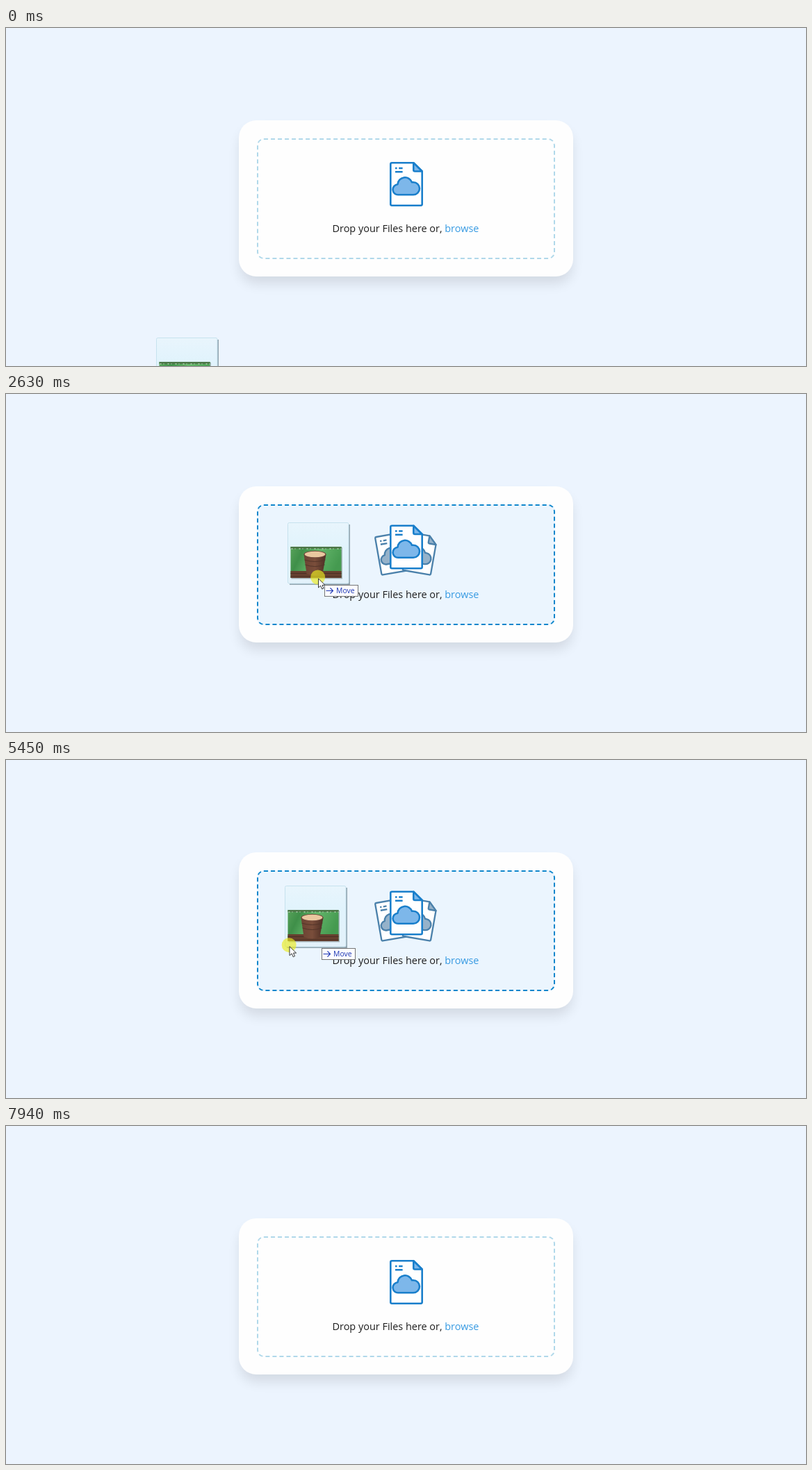
These frames come from a looping animation (1151x487 px, 8000 ms). An HTML page:

```html
<!DOCTYPE html>
<html lang="en">
<head>
<meta charset="utf-8">
<title>File drop</title>
<style>
  html, body { margin: 0; width: 100%; height: 100%; overflow: hidden; background: #ecf4fe; }
  #card, #zone, svg { position: absolute; box-sizing: border-box; }
  #card { left: 335px; top: 133px; width: 481px; height: 225px; border-radius: 25px;
          background: #fefefe; box-shadow: 0 12px 18px -2px rgba(0, 0, 0, .11); }
  #zone { left: 361px; top: 159px; width: 429px; height: 174px; border-radius: 10px; border: 2px dashed; }
  svg { left: 0; top: 0; }
  text { font-family: "Open Sans", "Noto Sans", sans-serif; }
  .page { stroke: #1a7fcb; fill: #7db7ea; stroke-width: 2.6; stroke-linejoin: round; }
  .muted { stroke: #4b81ab; fill: #95b2ca; }
</style>
</head>
<body>
<div id="card"></div>
<div id="zone"></div>
<svg width="1151" height="487" viewBox="0 0 1151 487">
  <defs>
    <g id="doc">
      <path fill="#fff" d="M-22.7-28.7q0-2 2-2H10.3L22.7-18.5V28.7q0 2-2 2H-20.7q-2 0-2-2Z"/>
      <path d="M10.3-30.7V-20.5q0 2 2 2H22.7Z"/>
      <path fill="none" d="M-16-23h2.6m2.6 0h5.4M-16-17.8H-5.4"/>
      <path d="M10 15.2A9 9 0 0 0 10-2.8H8A10.6 10.6 0 0 0-12.5.2A7.5 7.5 0 0 0-11.4 15.2Z"/>
    </g>
    <linearGradient id="glass" x2="0" y2="1">
      <stop stop-color="#e8f5fc" stop-opacity=".85"/>
      <stop offset=".4" stop-color="#def3fc" stop-opacity=".8"/>
      <stop offset="1" stop-color="#e2f1fa" stop-opacity=".85"/>
    </linearGradient>
    <linearGradient id="leaves" x2="1" y2=".3">
      <stop stop-color="#58a35a"/><stop offset=".25" stop-color="#3f8f49"/>
      <stop offset=".55" stop-color="#63b56a"/><stop offset="1" stop-color="#459a50"/>
    </linearGradient>
    <linearGradient id="clay">
      <stop stop-color="#6b4333"/><stop offset=".5" stop-color="#7a4e3b"/><stop offset="1" stop-color="#4c2e25"/>
    </linearGradient>
  </defs>

  <use id="left" href="#doc" class="page muted"/>
  <use id="right" href="#doc" class="page muted"/>
  <use id="front" href="#doc" class="page"/>
  <text x="469.5" y="294" font-size="14.45" fill="#1c1c1c">Drop your Files here or, <tspan fill="#369ae2">browse</tspan></text>

  <g id="file">
    <path d="M3 89H89V3" fill="none" stroke="#7d929c" stroke-width="2" opacity=".8"/>
    <rect x=".5" y=".5" width="87.5" height="87.5" rx="2" fill="url(#glass)" stroke="#c6e2ee"/>
    <g transform="translate(4.5 35)">
      <rect x="1" y="1" width="73.5" height="45.5" fill="#6d7d80" opacity=".5"/>
      <rect width="73" height="45" fill="url(#leaves)"/>
      <path d="M0 1.5H73" stroke="#4d7848" stroke-width="3"/>
      <path d="M1 3H73" stroke="#dcefdc" stroke-dasharray="2 3 1 5"/>
      <rect y="35" width="73" height="10" fill="#66402f"/>
      <path d="M0 38.5H73M0 43H73" stroke="#4a2f25"/>
      <path d="M19 11L23 39Q35 44 46 39L51 11Z" fill="url(#clay)"/>
      <path d="M20 19Q35 24 50 19M21 26Q35 31 49 26" fill="none" stroke="#533529"/>
      <ellipse cx="35" cy="11" rx="16" ry="5.3" fill="#70473a"/>
      <ellipse cx="35" cy="11" rx="14.8" ry="4.2" fill="#e9c79f"/>
    </g>
  </g>
  <g id="cursor">
    <circle r="10.5" fill="#ecec20" opacity=".66"/>
    <path transform="translate(.8 2)" d="M0 0V13L3.1 10.2 5.2 15 7.5 14 5.5 9.4H9.6Z" fill="#fff" stroke="#222" stroke-width=".9"/>
  </g>
  <g id="label" fill="none" stroke="#1d36b4">
    <rect id="frame" x=".5" y=".5" height="16" fill="#fcfcff" stroke="#767676"/>
    <path id="sign"/>
    <text id="action" x="17" y="12.3" font-size="10.4" fill="#1d36b4" stroke="none"></text>
  </g>
</svg>
<script>
const LOOP = 8000, FADE = 350, LEAD = 34, MAX_LEAD = 38;

// Each drag: start, end, then evenly timed places of the file. It rests until the next drag.
const drags = [
  [0, 0, '216,446'],
  [380, 539, '217,439 217,448'],
  [540, 540, '262,500'],
  [770, 1550, '262,478 281,413 302,352 312,299 311,272'],
  [1620, 1850, '310,268 305,254'],
  [2180, 2630, '309,250 342,221 386,194 405,185'],
  [3190, 3600, '380,185 160,183 132,184 120,185'],
  [4120, 4890, '122,180 180,140 270,133 365,160 409,183'],
  [5450, 5920, '402,181 235,210 118,219 83,222'],
  [6160, 6930, '86,221 165,209 290,193 378,184 406,180'],
  [7400, 7880, '402,168 362,66 294,24 244,2'],
  [7940, 7940, '244,-140']
].map(([from, to, path]) => ({ from, to, points: path.split(' ').map(point => point.split(',').map(Number)) }));
const hovers = [[2240, 3210], [4470, 5520], [6480, 7480]];

const el = id => document.getElementById(id);
const mix = (a, b, p) => a + (b - a) * p;
const mixColor = (a, b, p) => `rgb(${a.map((v, i) => mix(v, b[i], p))})`;
const place = (id, x, y, more = '') => el(id).setAttribute('transform', `translate(${x} ${y})${more}`);

function smooth(x) {
  const p = Math.min(1, Math.max(0, x));
  return p * p * (3 - 2 * p);
}

// File position, and how far the pointer runs ahead of it in fast moves.
function pose(t) {
  const { from, to, points } = drags.findLast(drag => drag.from <= t);
  const last = points.length - 1;
  if (t >= to) return [...points[last], 0, 0];
  const at = (t - from) / (to - from) * last, i = Math.floor(at);
  const [a, b] = [points[i], points[i + 1]];
  const velocity = a.map((v, k) => (b[k] - v) * last / (to - from));
  const speed = Math.hypot(...velocity);
  const ahead = Math.min(LEAD * speed, MAX_LEAD / (speed || 1));
  return [...a.map((v, k) => mix(v, b[k], at - i)), ...velocity.map(v => v * ahead)];
}

function drawZone(p) {
  el('zone').style.borderColor = mixColor([176, 216, 234], [14, 134, 204], p);
  el('zone').style.backgroundColor = mixColor([254, 254, 254], [235, 245, 254], p);
  place('front', 576, 225 - 4.5 * p);
  for (const [id, side] of [['left', -1], ['right', 1]]) {
    place(id, 575.7 + side * 19.8 * p, 226 + 4 * p, ` rotate(${side * 10 * p}) scale(.9)`);
    el(id).style.visibility = p > 0 ? 'visible' : 'hidden';
  }
}

function drawLabel(inside) {
  el('action').textContent = inside ? 'Move' : 'Copy';
  el('frame').setAttribute('width', inside ? 48 : 46);
  el('sign').setAttribute('d', inside ? 'M2.5 8.5H12.5M8.5 4.5L12.5 8.5 8.5 12.5' : 'M4 8.5H13M8.5 4V13');
  el('sign').setAttribute('stroke-width', inside ? 1.1 : 2);
}

function draw(t) {
  const [x, y, leadX, leadY] = pose(t);
  drawZone(hovers.reduce((sum, [enter, leave]) =>
    sum + smooth((t - enter) / FADE) - smooth((t - leave) / FADE), 0));
  drawLabel(hovers.some(([enter, leave]) => t >= enter && t < leave));
  place('file', Math.round(x), Math.round(y));
  place('cursor', x + 43.7 + leadX, y + 79 + leadY);
  place('label', Math.round(x) + 53, Math.round(y) + 90);
}

const start = performance.now();
function tick() {
  draw(Math.max(0, performance.now() - start) % LOOP);
  requestAnimationFrame(tick);
}
tick();
</script>
</body>
</html>
```
